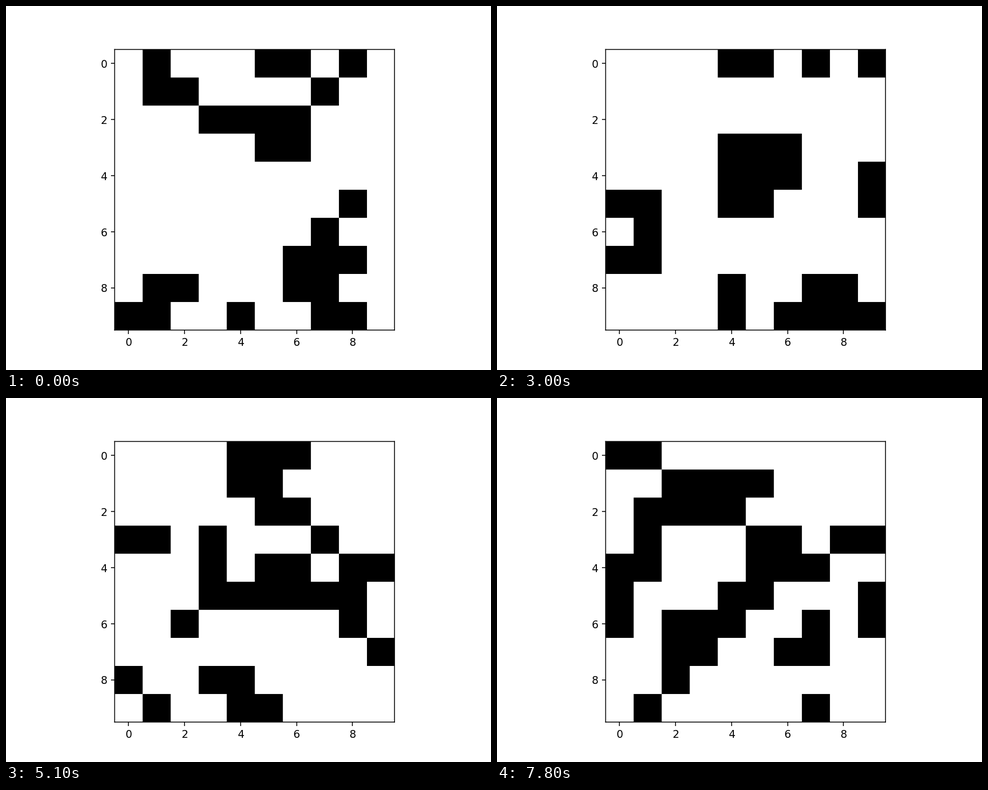
A matplotlib script that plays this animation: 864x648 px, repeating every 8 s.

```python
import matplotlib.pyplot as plt
import numpy as np
from matplotlib.animation import FuncAnimation
from matplotlib.patches import PathPatch
from matplotlib.path import Path
from matplotlib.transforms import Affine2D

INTERVAL = 100          # ms per animation frame
FRAMES = 80
FRAMES_PER_STEP = 3     # a new generation every 300 ms

# Stage and frame geometry in pixels
STAGE_W, STAGE_H, DPI = 864, 648, 135
LEFT, TOP, RIGHT, BOTTOM = 193.5, 77.4, 692.1, 576.9

START = """
.X...XX.X.
.XX....X..
...XXXX...
.....XX...
..........
........X.
.......X..
......XXX.
.XX...XX..
XX..X..XX.
"""


def parse(text):
    return np.array([[int(c == "X") for c in row] for row in text.split()])


def next_generation(cells):
    """Conway's Game of Life on a torus."""
    neighbours = sum(
        np.roll(cells, (dy, dx), axis=(0, 1))
        for dy in (-1, 0, 1)
        for dx in (-1, 0, 1)
        if (dy, dx) != (0, 0)
    )
    born_or_kept = (neighbours == 3) | ((neighbours == 2) & (cells == 1))
    return born_or_kept.astype(int)


def cell_path(cells):
    """One path for all live cells, so neighbours join without seams."""
    # Cells stay square although the frame is slightly narrower than high.
    stretch = (BOTTOM - TOP) / (RIGHT - LEFT)
    squares = [
        Path.unit_rectangle().transformed(
            Affine2D().translate(x, y).scale(stretch, 1).translate(-0.5, -0.5))
        for y, x in np.argwhere(cells)
    ]
    return Path.make_compound_path(*squares)


generations = [parse(START)]
while len(generations) * FRAMES_PER_STEP < FRAMES:
    generations.append(next_generation(generations[-1]))
paths = [cell_path(cells) for cells in generations]

fig = plt.figure(figsize=(STAGE_W / DPI, STAGE_H / DPI), dpi=DPI)
ax = fig.add_axes([LEFT / STAGE_W, 1 - BOTTOM / STAGE_H,
                   (RIGHT - LEFT) / STAGE_W, (BOTTOM - TOP) / STAGE_H])
ax.set(xlim=(-0.5, 9.5), ylim=(9.5, -0.5),
       xticks=range(0, 10, 2), yticks=range(0, 10, 2))
for spine in ax.spines.values():
    spine.set_snap(False)
live = ax.add_patch(PathPatch(paths[0], facecolor="black", linewidth=0,
                              snap=False))


def update(frame):
    live.set_path(paths[frame // FRAMES_PER_STEP])
    return (live,)


animation = FuncAnimation(fig, update, frames=FRAMES, interval=INTERVAL,
                          init_func=lambda: update(0), repeat=True)
plt.show()
```
